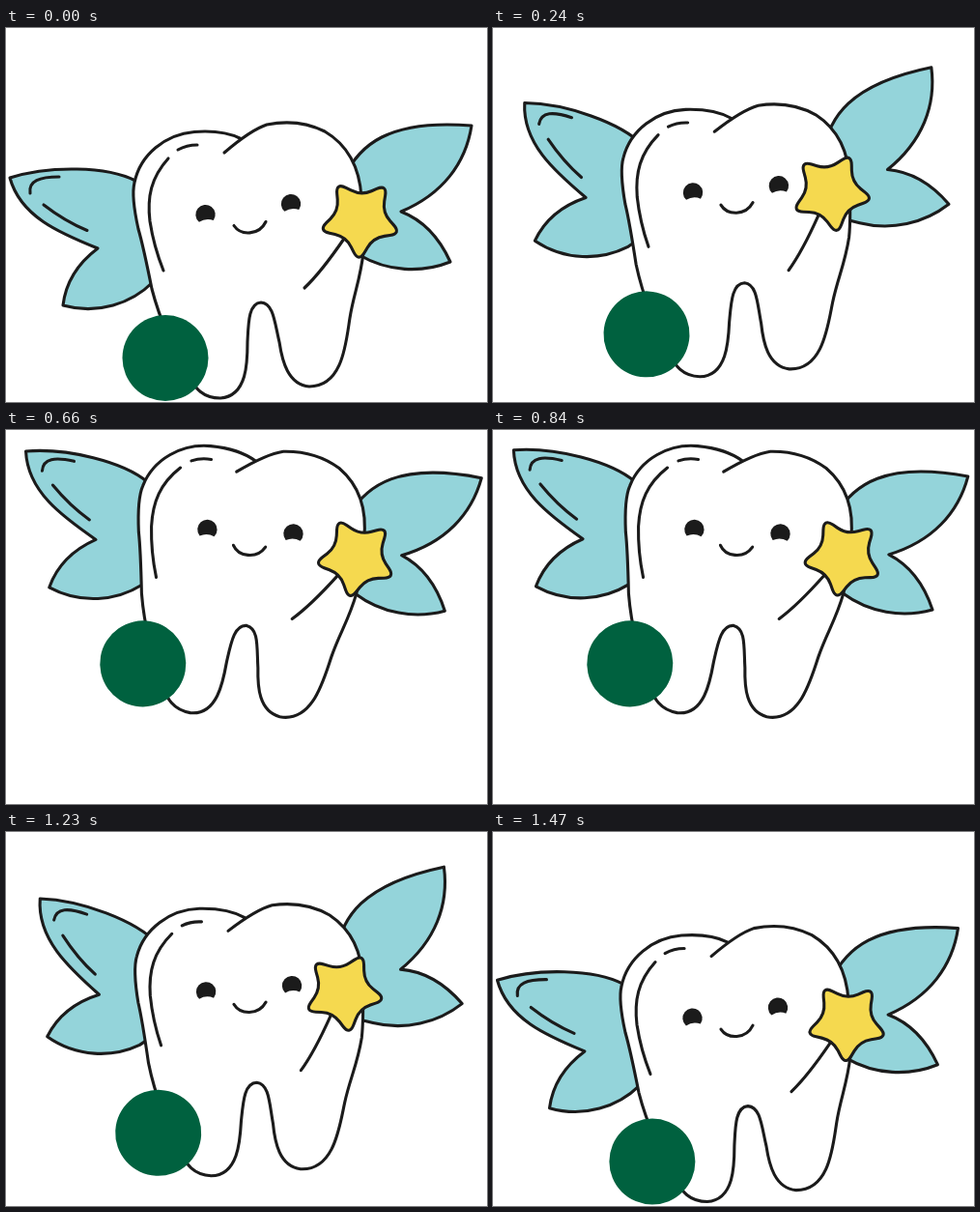
An HTML page that plays this animation: 498x387 px, repeating every 1500 ms.

```html
<!DOCTYPE html>
<html lang="en">
<head>
<meta charset="utf-8">
<title>Tooth fairy</title>
<style>
  html, body { margin: 0; width: 100%; height: 100%; overflow: hidden; background: #fff; }
  svg { display: block; width: 498px; height: 387px; }
  .line { fill: none; }
  .wing { fill: #94d4da; }
</style>
</head>
<body>
<svg viewBox="0 0 498 387" stroke="#1b1b1b" stroke-width="3.1" stroke-linecap="round" stroke-linejoin="round">
  <defs>
    <path id="eye" d="M-7.5 7A10.2 10.2 0 1 1 7.5 7Q0 3.2 -7.5 7Z" fill="#1b1b1b" stroke="none"/>
  </defs>
  <g id="fairy">
    <g id="leftWing">
      <path class="wing" d="M185 219L175 185C160 172 148 164 134 158C105 143 45 142 4 155C15 195 55 212 95 228C75 243 62 262 59 287C95 297 130 285 152 263Z"/>
      <path class="line" d="M25 171C23 158 35 154 55 154M39 183Q61 200 84 209.5"/>
    </g>
    <path id="rightWing" class="wing" d="M318 182L350 155C365 122 395 94 482 101C476 140 452 172 409 190C435 200 450 220 460 242C430 254 395 252 366 235L340 220Z"/>

    <path fill="#fff" d="M226 129C240 117 255 105 270 100C290 96 312 98 330 107C352 120 366 143 368 175C370 200 371 215 370 232C367 260 360 275 356 300C352 325 349 371 314 371C292 369 286 345 283 325C278 304 277 285 264 284C251 285 251 305 250 325C250 345 250 381 222 383C203 383 196 372 188 360C175 335 160 305 151 270C145 240 142 225 137 208C133 190 130 172 133 160C139 131 165 110 195 107.5C215 106 230 108 243 114.5"/>
    <path class="line" d="M198 121Q187 121 178 126M168 135C150 155 146 175 149 200Q153 226 163 251"/>

    <use href="#eye" transform="translate(206.5 193) rotate(-7)"/>
    <use href="#eye" transform="translate(295 182) rotate(-7)"/>
    <path class="line" d="M236 204.5C243 215 262 215 269 200.5"/>

    <circle cx="165" cy="341.5" r="44.5" fill="#00613f" stroke="none"/>

    <g id="wand">
      <path class="line" d="M309 269Q326 253 350 218"/>
      <path id="star" fill="#f5d94f"/>
    </g>
  </g>
</svg>
<script>
  const LOOP = 1500, FLAP = 750, STEP = 30;
  const byId = id => document.getElementById(id);
  const [fairy, leftWing, rightWing, wand] = ['fairy', 'leftWing', 'rightWing', 'wand'].map(byId);

  // Star whose corners are rounded by cutting each edge near its ends
  function starPath(cx, cy, outer, inner, turn, cut) {
    const corners = Array.from({ length: 10 }, (_, i) => {
      const angle = (turn + i * 36) * Math.PI / 180, r = i % 2 ? inner : outer;
      return [cx + r * Math.cos(angle), cy + r * Math.sin(angle)];
    });
    const toward = (a, b) => a.map((v, k) => v + (b[k] - v) * cut);
    return corners.map((c, i) => {
      const start = toward(c, corners[(i + 9) % 10]), end = toward(c, corners[(i + 1) % 10]);
      return `${i ? 'L' : 'M'}${start}Q${c} ${end}`;
    }).join('') + 'Z';
  }
  byId('star').setAttribute('d', starPath(366.8, 197.3, 45, 24, 20, 0.4));

  // Eases 0 -> 1 until the peak, then back to 0 at the end of the period
  function swing(t, period, peak) {
    const p = t % period;
    const x = p < peak ? p / peak : (period - p) / (period - peak);
    return x * x * (3 - 2 * x);
  }
  const rotate = (el, angle, x, y) => el.setAttribute('transform', `rotate(${angle} ${x} ${y})`);

  function draw(now) {
    const t = Math.floor(now % LOOP / STEP) * STEP;
    const rise = swing(t, LOOP, 750), flap = swing(t, FLAP, 360);
    fairy.setAttribute('transform',
      `translate(${2 * rise} ${-94 * rise}) rotate(${10.4 * rise} 206 193)`);
    rotate(leftWing, 21.4 * flap, 185, 219);
    rotate(rightWing, -25.2 * flap, 318, 182);
    rotate(wand, -17.3 * flap, 309, 269);
    requestAnimationFrame(draw);
  }
  draw(performance.now());
</script>
</body>
</html>
```
